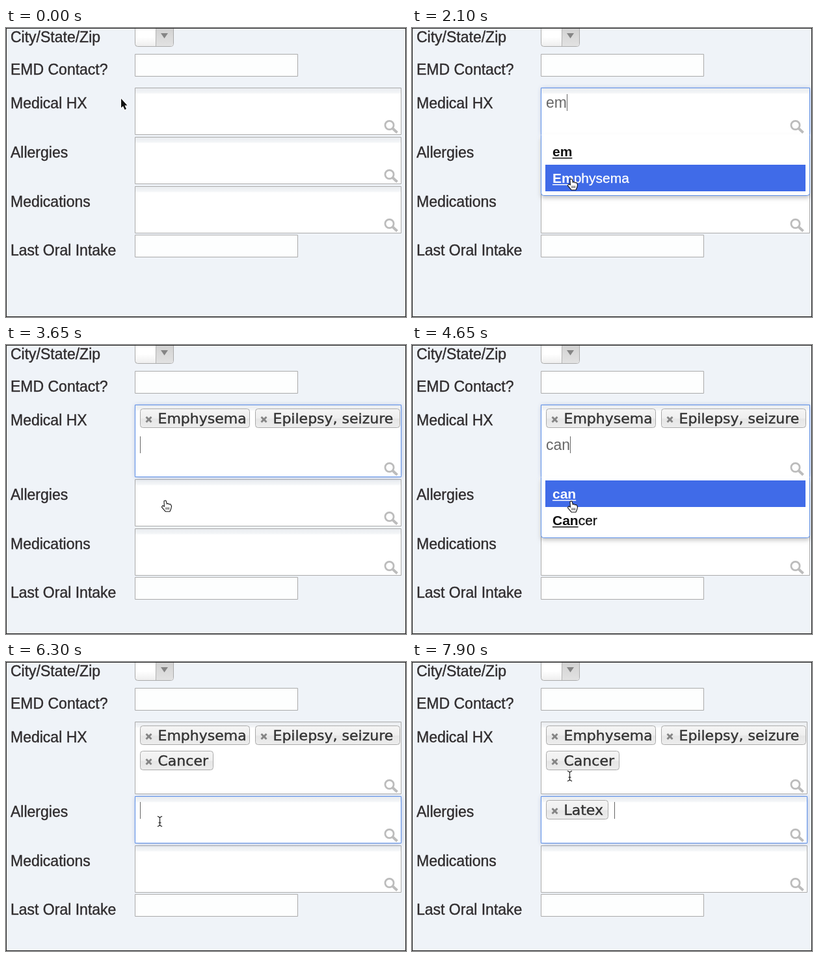
An HTML page with a canvas that plays this animation: 615x446 px, repeating every 8000 ms.

```html
<!DOCTYPE html>
<html lang="en">
<head>
<meta charset="utf-8">
<title>Tag entry form</title>
<style>
html, body { margin: 0; width: 100%; height: 100%; overflow: hidden; background: #eff3f8; }
canvas { display: block; }
</style>
</head>
<body>
<canvas id="stage" width="615" height="446"></canvas>
<script>
const ctx = document.getElementById('stage').getContext('2d');
const LOOP = 8000;
const SANS = '"Liberation Sans", Arial, sans-serif';
const LABEL_FONT = '23px ' + SANS;
const INPUT_FONT = '23px ' + SANS;
const CHIP_FONT = '22px "DejaVu Sans", sans-serif';
const BLUE = '#5c8fe8';
const ROW = 41;
const FIELD_HEIGHT = 73;

const CONDITIONS = ['Cancer', 'Diabetes', 'Emphysema', 'Epilepsy, seizure', 'Heart disease'];
const ALLERGENS = ['Latex', 'Penicillin', 'Sulfa'];

// [start time, value]
const TYPED = [[0, ''], [950, 'e'], [1150, 'em'], [2200, ''], [2450, 'e'], [2650, 'ep'], [3600, ''],
  [3900, 'c'], [4100, 'ca'], [4300, 'can'], [5050, ''], [6700, 'l'], [6800, 'la'], [6900, 'lat'], [7850, '']];
const FOCUS = [[0, ''], [500, 'history'], [5450, ''], [5550, 'allergies']];
const CARET = [[0, true], [800, false], [950, true], [5900, false], [6300, true]];
const POINTER = [[0, 'arrow'], [950, ''], [1400, 'arrow'], [1750, 'hand'], [2450, ''], [3100, 'hand'],
  [3700, 'beam'], [3900, ''], [4600, 'hand'], [5150, 'beam'], [6700, ''], [7350, 'beam'], [7500, 'hand'], [7850, 'beam']];
const PATH = [[0, 177, 109], [50, 177, 109], [500, 208, 106], [1400, 208, 106], [2100, 245, 233],
  [3100, 245, 233], [3550, 245, 240], [4600, 245, 240], [5000, 250, 268], [5100, 250, 268],
  [5400, 236, 246], [7350, 236, 246], [7750, 242, 176], [LOOP, 242, 176]];

// [time added, text, x, y offset in field, width]
const HISTORY_CHIPS = [[2200, 'Emphysema', 206, 6, 169], [3600, 'Epilepsy, seizure', 383, 6, 223], [5050, 'Cancer', 206, 45, 113]];
const ALLERGY_CHIPS = [[7850, 'Latex', 206, 6, 96]];

function valueAt(track, t) {
  let value = track[0][1];
  for (const [start, next] of track) if (t >= start) value = next;
  return value;
}

function pointAt(t) {
  const i = Math.max(1, PATH.findIndex(p => p[0] > t));
  const [t0, x0, y0] = PATH[i - 1], [t1, x1, y1] = PATH[i];
  const k = (t - t0) / (t1 - t0), e = k * k * (3 - 2 * k);
  return { x: Math.round(x0 + (x1 - x0) * e), y: Math.round(y0 + (y1 - y0) * e) };
}

// An optional thin outline gives the letters a little more weight.
function text(str, x, y, font, color, outline = 0) {
  ctx.font = font;
  ctx.fillStyle = color;
  ctx.fillText(str, x, y);
  if (outline) {
    ctx.strokeStyle = color;
    ctx.lineWidth = outline;
    ctx.strokeText(str, x, y);
  }
  return ctx.measureText(str).width;
}

function rect(x, y, w, h, color) {
  ctx.fillStyle = color;
  ctx.fillRect(x, y, w, h);
}

function box(x, y, w, h, radius, fill, stroke) {
  ctx.beginPath();
  ctx.roundRect(x + .5, y + .5, w - 1, h - 1, radius);
  ctx.fillStyle = fill;
  ctx.fill();
  ctx.shadowColor = 'transparent';
  ctx.strokeStyle = stroke;
  ctx.lineWidth = 1;
  ctx.stroke();
}

function shadow(color, blur, dy = 0) {
  ctx.shadowColor = color;
  ctx.shadowBlur = blur;
  ctx.shadowOffsetY = dy;
}

function vertical(y0, y1, ...stops) {
  const g = ctx.createLinearGradient(0, y0, 0, y1);
  stops.forEach(([at, color]) => g.addColorStop(at, color));
  return g;
}

function polygon(points, fill, stroke, width) {
  ctx.beginPath();
  points.forEach(([x, y]) => ctx.lineTo(x, y));
  ctx.closePath();
  if (stroke) {
    ctx.strokeStyle = stroke;
    ctx.lineWidth = width;
    ctx.lineJoin = 'round';
    ctx.stroke();
  }
  ctx.fillStyle = fill;
  ctx.fill();
}

function line(x0, y0, x1, y1, color, width) {
  ctx.beginPath();
  ctx.moveTo(x0, y0);
  ctx.lineTo(x1, y1);
  ctx.strokeStyle = color;
  ctx.lineWidth = width;
  ctx.stroke();
}

function drawSelect() {
  box(198, -20, 60, 49, 4, vertical(0, 28, [0, '#fff'], [.5, '#fff'], [1, '#eee']), '#aaa');
  ctx.beginPath();
  ctx.roundRect(230, -20, 27, 48, [0, 0, 3, 0]);
  ctx.fillStyle = vertical(0, 28, [0, '#d2d2d2'], [1, '#e2e2e2']);
  ctx.fill();
  line(230.5, 0, 230.5, 28, '#b4b4b4', 1);
  polygon([[238, 8], [249, 8], [243.5, 16]], '#858585');
}

function drawMagnifier(bottom) {
  ctx.beginPath();
  ctx.arc(589.5, bottom - 15, 6.6, 0, Math.PI * 2);
  ctx.strokeStyle = '#bcbcbc';
  ctx.lineWidth = 2.8;
  ctx.stroke();
  line(594.5, bottom - 10, 601.5, bottom - 3.5, '#bcbcbc', 4);
}

function drawField(y, h, right, focused, flipped) {
  if (focused) shadow('rgba(60,90,170,.45)', 7);
  const fill = flipped
    ? vertical(y, y + h, [0, '#fff'], [.2, '#f3f5f8'], [.5, '#eee'], [1, '#eee'])
    : vertical(y, y + h, [0, '#e8ebef'], [8 / h, '#f3f5f7'], [10 / h, '#fff'], [1, '#fff']);
  box(198, y, right - 198, h, 0, fill, focused ? BLUE : '#aaa');
  drawMagnifier(y + h);
}

function drawChip(label, x, y, w) {
  box(x, y, w, 30, 4, vertical(y, y + 30, [0, '#f5f5f5'], [.5, '#efefef'], [.54, '#e6e6e6'], [1, '#ededed']), '#aaa');
  const cx = x + 13.5, cy = y + 17, r = 4;
  line(cx - r, cy - r, cx + r, cy + r, '#858585', 3);
  line(cx - r, cy + r, cx + r, cy - r, '#858585', 3);
  text(label, x + 27.5, y + 23, CHIP_FONT, '#333', .4);
}

function drawOption(label, query, y, selected) {
  const color = selected ? '#fff' : '#111';
  const at = label.toLowerCase().indexOf(query), end = at + query.length;
  let x = 216;
  x += text(label.slice(0, at), x, y, '21px ' + SANS, color);
  const w = text(label.slice(at, end), x, y, 'bold 21px ' + SANS, color);
  rect(x, y + 2, w, 1.5, color);
  text(label.slice(end), x + w, y, '21px ' + SANS, color, .3);
}

function drawDropdown(options, query, edge, right, above, pointer) {
  const height = options.length * ROW + 12;
  const top = above ? edge - height : edge;
  const first = above ? top + 7 : top + 5;
  const hovered = pointer ? Math.floor((pointer.y - first) / ROW) : 0;
  const active = hovered > 0 && hovered < options.length ? hovered : 0;
  shadow('rgba(0,0,0,.22)', 6, above ? -3 : 4);
  box(198, top, right - 198, height, above ? [4, 4, 0, 0] : [0, 0, 4, 4], '#fff', BLUE);
  // Joins the list to its field.
  rect(199, edge - 1, right - 200, 2, '#fff');
  rect(205, first + active * ROW, right - 212, ROW, '#406be8');
  options.forEach((option, i) => drawOption(option, query, first + i * ROW + 28, i === active));
}

function drawInput(str, x, y, caretOn) {
  const w = text(str, x, y + 22, INPUT_FONT, '#666');
  if (caretOn) rect(Math.round(x + w), y + 1, 1, 26, '#666');
}

function drawPointer(kind, { x, y }) {
  ctx.save();
  ctx.translate(x, y);
  if (kind === 'arrow') {
    polygon([[0, 0], [0, 14], [3, 11.5], [5.5, 17], [8, 16], [5.5, 10.5], [9.5, 10.5]], '#111', '#fff', 2);
  } else if (kind === 'hand') {
    polygon([[-1.5, 1], [.5, .5], [2, 6], [4, 5], [5.5, 6.5], [7.5, 6], [9, 9], [8, 13], [6.5, 16.5],
      [.5, 16.5], [-5, 10], [-4, 8.5], [-1, 10]], '#fff', '#111', 2.2);
    for (const lx of [1, 3.2, 5.4]) line(lx, 10.5, lx, 14, '#333', 1);
  } else if (kind === 'beam') {
    for (const [color, w] of [['#fff', 3], ['#222', 1.2]]) {
      line(.5, -7, .5, 7, color, w);
      for (const s of [-1, 1]) {
        line(.5, 6 * s, -3, 8 * s, color, w);
        line(.5, 6 * s, 4, 8 * s, color, w);
      }
      line(-1.5, 2, 2.5, 2, color, w);
    }
  }
  ctx.restore();
}

function draw(t) {
  const typed = valueAt(TYPED, t);
  const focus = valueAt(FOCUS, t);
  const caretOn = valueAt(CARET, t);
  const kind = valueAt(POINTER, t);
  const pointer = pointAt(t);
  const onHistory = focus === 'history', onAllergies = focus === 'allergies';
  const shift = t >= 3600 ? 39 : 0;
  const right = typed && (t < 2450 || t >= 3900) ? 612 : 608;
  const allergiesY = 168 + shift;

  rect(0, 0, 615, 446, '#eff3f8');
  const labels = [['City/State/Zip', 22], ['EMD Contact?', 72], ['Medical HX', 124],
    ['Allergies', 200 + shift], ['Medications', 276 + shift], ['Last Oral Intake', 351 + shift]];
  labels.forEach(([label, y]) => text(label, 7, y, LABEL_FONT, '#302d2f', .4));

  drawSelect();
  box(198, 40, 251, 35, 0, '#fdfefe', '#aaa');
  box(198, 319 + shift, 251, 35, 0, '#fdfefe', '#aaa');
  drawField(244 + shift, FIELD_HEIGHT, right, false);
  drawField(allergiesY, FIELD_HEIGHT, right, onAllergies, onAllergies && typed);
  drawField(92, FIELD_HEIGHT + shift, right, onHistory);

  const chips = HISTORY_CHIPS.filter(c => t >= c[0]);
  const allergyChips = ALLERGY_CHIPS.filter(c => t >= c[0]);
  chips.forEach(([, label, x, dy, w]) => drawChip(label, x, 92 + dy, w));
  allergyChips.forEach(([, label, x, dy, w]) => drawChip(label, x, allergiesY + dy, w));

  if (focus) {
    const list = onHistory ? chips : allergyChips;
    const last = list[list.length - 1];
    const wrapped = onHistory && list.length === 2;
    const x = last && !wrapped ? last[2] + last[4] + 9 : 206;
    const y = onHistory ? (shift ? 140 : 101) : allergiesY + 8;
    drawInput(typed, x, y, caretOn);
  }
  if (typed) {
    const source = onHistory ? CONDITIONS : ALLERGENS;
    const options = [typed, ...source.filter(s => s.toLowerCase().includes(typed))];
    const edge = onHistory ? 165 + shift : allergiesY;
    drawDropdown(options, typed, edge, right, onAllergies, kind && pointer);
  }

  drawPointer(kind, pointer);
  ctx.strokeStyle = '#222';
  ctx.lineWidth = 1;
  ctx.strokeRect(.5, .5, 614, 445);
}

const start = performance.now();
function tick() {
  draw((performance.now() - start) % LOOP);
  requestAnimationFrame(tick);
}
tick();
</script>
</body>
</html>
```
